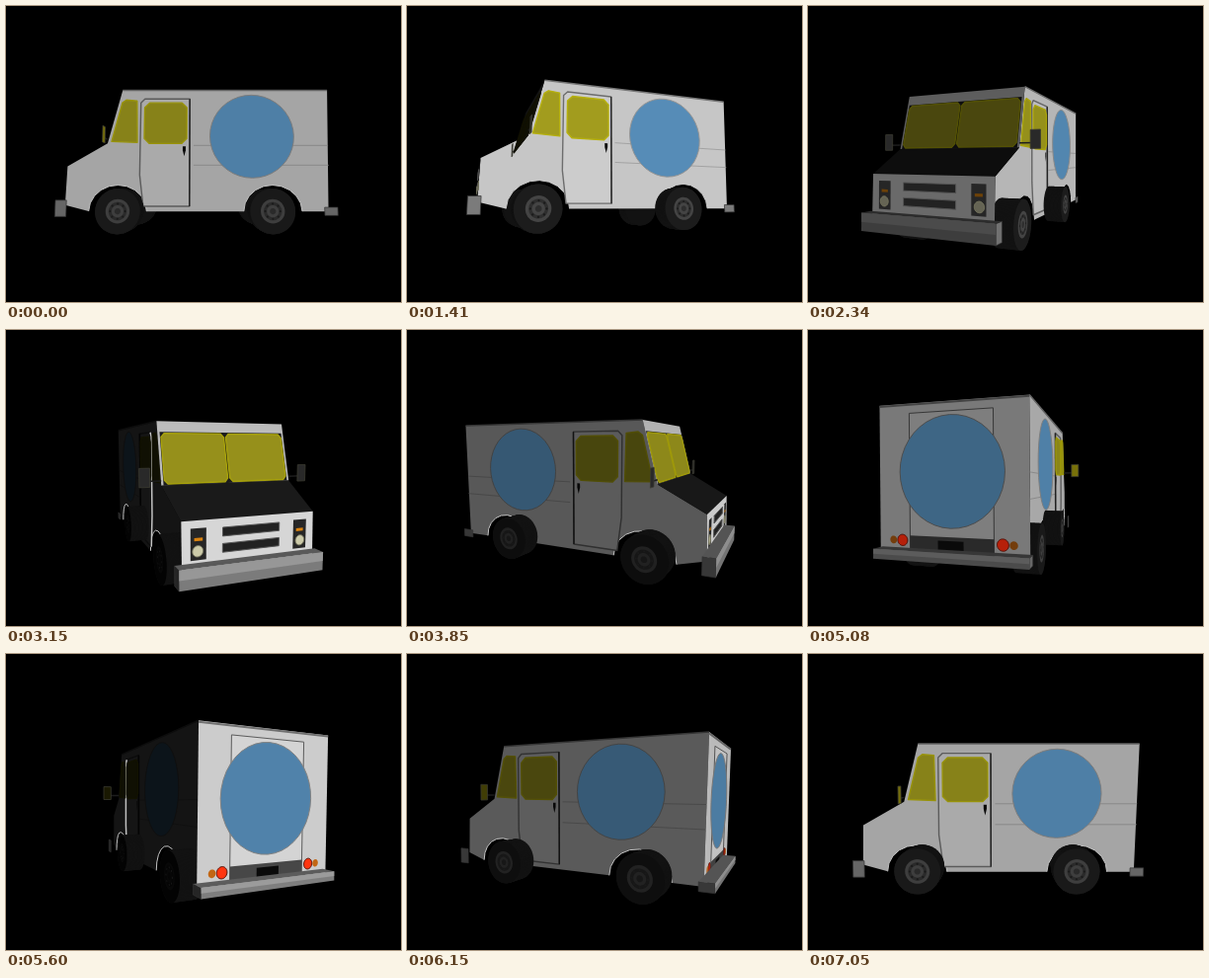
Recreate the animation shown at these times as an HTML page with a canvas. Size 400 by 300 pixels, loop 7.89 s.

```html
<!DOCTYPE html>
<html lang="en">
<head>
<meta charset="utf-8">
<title>Turning van</title>
<style>
  html, body { margin: 0; width: 100%; height: 100%; overflow: hidden; background: #000; }
  canvas { display: block; }
</style>
</head>
<body>
<canvas id="stage" width="400" height="300"></canvas>
<script>
const ctx = document.getElementById('stage').getContext('2d');
const LOOP = 7890, START = 700, STEP = 135, TURNS = 47;
const FOCAL = 362, HALF = 64;

// camera path: step, yaw, pitch, distance
const PATH = [
  [-1, 0, -6, 425], [5, 20, -8.5, 425], [18, 110.5, 5.3, 416], [28, 200, 3, 398],
  [32, 253, -1, 402], [40, 333, 2, 397], [47, 360, 3.3, 406]
];

// smooth curve through the path, at rest at both ends
function follow(k, col) {
  const last = PATH.length - 1;
  let i = 0;
  while (i < last - 1 && k >= PATH[i + 1][0]) i++;
  const a = PATH[i], b = PATH[i + 1], d = b[0] - a[0], u = (k - a[0]) / d, v = 1 - u;
  const slope = j => j < 1 || j >= last ? 0 :
    (PATH[j + 1][col] - PATH[j - 1][col]) / (PATH[j + 1][0] - PATH[j - 1][0]);
  return v * v * (1 + 2 * u) * a[col] + u * u * (3 - 2 * u) * b[col] +
    u * v * d * (v * slope(i) - u * slope(i + 1));
}

let cam;   // current view

function setCamera(k) {
  const [a, p] = [1, 2].map(c => follow(k, c) * Math.PI / 180);
  const dist = follow(k, 3);
  const pan = -13 * Math.sin(Math.PI * (k + 1) / (TURNS + 1)) ** 2;
  const ca = Math.cos(a), sa = Math.sin(a), cp = Math.cos(p), sp = Math.sin(p);
  // the lamp stands to the right of the viewer
  const lit = (across, toward) => Math.max(20, 165 * toward + 125 * across);
  cam = { ca, sa, cp, sp, dist, pan,
    x: dist * cp * sa, n: dist * cp * ca, h: dist * sp,
    left: lit(sa, ca), right: lit(-sa, -ca), front: lit(-ca, sa), back: lit(ca, -sa) };
}

// x runs to the nose, h up, n to the left-hand side
function project(x, h, n) {
  const q = -x * cam.sa - n * cam.ca;
  const k = FOCAL / (cam.dist + q * cam.cp - h * cam.sp);
  return [200 + cam.pan + k * (n * cam.sa - x * cam.ca), 150 - k * (h * cam.cp + q * cam.sp)];
}

const tint = (v, r = 1, g = r, b = r) =>
  `rgb(${[r, g, b].map(c => Math.round(Math.min(255, v * c))).join()})`;

function draw(pts, fill, stroke, width = 1, open) {
  ctx.beginPath();
  pts.forEach(p => ctx.lineTo(...p));
  if (!open) ctx.closePath();
  if (fill) { ctx.fillStyle = fill; ctx.fill(); }
  if (stroke) { ctx.strokeStyle = stroke; ctx.lineWidth = width; ctx.stroke(); }
}

const on = (place, pts) => pts.map(p => place(...p));
const rect = (a, b, c, d) => [[a, c], [b, c], [b, d], [a, d]];
const cut = (a, b, c, d, i, j = i) => [[a + i, c], [b - i, c], [b, c + j], [b, d - j],
  [b - i, d], [a + i, d], [a, d - j], [a, c + j]];
const arc = (x, y, rx, ry, turn, n) => Array.from({ length: n + 1 }, (_, i) =>
  [x + rx * Math.cos(i * turn / n), y + ry * Math.sin(i * turn / n)]);
const ring = (x, y, r) => arc(x, y, r, r, 2 * Math.PI, 40);

// does the strip between two profile points face the camera?
const faces = ([x0, h0], [x1, h1]) => (cam.x - x0) * (h0 - h1) + (cam.h - h0) * (x1 - x0) > 0;
const sideSeen = s => s * cam.n > HALF;
const sideLight = s => s > 0 ? cam.left : cam.right;

// the nose is a little narrower than the box
const wide = x => HALF - 0.09 * Math.max(0, x - 97);

const AXLES = [85.5, -69], HUB = -64;
const arch = x => arc(x, HUB, 29, 26, Math.PI, 10);
const ROOF = [83, 59], COWL = [97, 4], NOSE = [138, -19], CHIN = [139, -58];
const TAIL = [-127, 59], HEEL = [-124, -64];
const PROFILE = [TAIL, ROOF, COWL, NOSE, CHIN, ...AXLES.flatMap(arch), HEEL];

function badge(place, x, h, r, light) {
  const k = Math.min(0.4 + 0.6 * light / 222, light / 150);
  draw(on(place, ring(x, h, r)), tint(k, 92, 150, 196), tint(light, 0.75));
}

function glass(place, pts, light) {
  draw(on(place, pts), tint(light, 0.82, 0.79, 0.15), tint(light, 0.92, 0.89, 0.06), 1.4);
}

function side(s) {
  const light = sideLight(s), rim = tint(Math.max(195, light));
  const at = (x, h) => project(x, h, s * wide(x));
  draw(on(at, PROFILE), tint(light));
  draw(on(at, [TAIL, ROOF]), null, tint(light, 0.6), 1.5, true);
  for (const x of AXLES) draw(on(at, arch(x)), null, rim, 1, true);
  for (const h of [2, -18]) draw(on(at, [[10, h], [-126, h]]), null, tint(light, 0.78), 0.8, true);

  const edge = [[60, 50], [64, 46], [64, -28], [60, -59]];
  draw(on(at, [[14, 50], ...edge, [14, -59]]), tint(light, 1.03), tint(light, 0.55), 1.4);
  draw(on(at, [[14, 50], [14, -59]]), null, tint(light, 0.2), 1.4, true);
  if (light < 60) draw(on(at, edge), null, rim, 1.5, true);
  glass(at, cut(17, 60, 4, 46, 5), light);
  glass(at, [[68, 48], [79, 49], [83, 46], [93, 6], [67, 5]], light);
  draw(on(at, [[18, 1], [21, 1], [21, -3], [19.5, -9], [18, -3]]), '#080808');
  badge(at, -49, 11.6, 42.5, light);
}

function wheel(x, s) {
  const seen = sideSeen(s), outer = HALF - 1;
  const disc = (r, n, colour, dx = 0, dh = 0) =>
    draw(on((a, h) => project(a, h, s * n), ring(x + dx, HUB + dh, r)), colour);
  for (let i = 0; i <= 22; i++) disc(22.5, seen ? outer - 22 + i : outer - i, '#121212');
  if (!seen) return;
  const v = Math.min(1.1, sideLight(s) / 165);
  disc(22.5, outer, tint(v, 25));
  for (let r = 12; r > 0; r -= 3) disc(r, outer, tint(v, r % 2 ? 42 : 62));
  for (let a = 0; a < 6.2; a += Math.PI / 4) {
    disc(1, outer, '#1a1a1a', 7.5 * Math.cos(a), 7.5 * Math.sin(a));
  }
}

function strip(p, q, fill) {
  const span = (e, s) => project(...e, s * wide(e[0]));
  draw([span(p, -1), span(p, 1), span(q, 1), span(q, -1)], fill);
}

function front() {
  const light = cam.front;
  if (faces(ROOF, COWL)) {
    const pane = (n, t) => project(ROOF[0] + 14 * t, ROOF[1] - 55 * t, n);
    strip(ROOF, COWL, tint(light, 0.95));
    draw(on(pane, rect(-62, 62, 0.17, 1)), tint(light, 0.14));
    for (const n of [-61, 1]) glass(pane, cut(n, n + 60, 0.19, 0.98, 3, 0.06), light * 0.92);
  }
  if (faces(COWL, NOSE)) strip(COWL, NOSE, tint(light, 0.13));
  if (faces(NOSE, CHIN)) {
    const at = (n, h) => project(138.5, h, n);
    strip(NOSE, CHIN, tint(light, 1.08));
    for (const h of [-33, -46]) draw(on(at, rect(-26, 26, h, h + 7)), '#222', '#555');
    for (const s of [-1, 1]) {
      draw(on(at, rect(s * 40, s * 53, -50, -25)), '#262626');
      draw(on(at, rect(s * 43, s * 50, -35, -32.5)), tint(light, 1.1, 0.66, 0.08));
      draw(on(at, ring(s * 47, -43, 4.4)), tint(light, 1.03, 1.02, 0.85), '#77765f');
    }
  }
}

function back() {
  if (!faces(HEEL, TAIL)) return;
  const light = cam.back;
  const at = (n, h) => project(-127 + (59 - h) * 0.024, h, n);
  strip(HEEL, TAIL, tint(light));
  draw(on(at, [[-HALF, 58], [HALF, 58]]), null, tint(light, 0.55), 2, true);
  draw(on(at, rect(-36, 36, -62, 51)), tint(light, 1.04), tint(light, 0.45));
  badge(at, 0, 3, 45, light * 0.85);
  draw(on(at, rect(-36, 36, -62, -49)), tint(light, 0.35));
  draw(on(at, rect(-11, 11, -60, -52)), '#0a0a0a');
  for (const s of [-1, 1]) {
    draw(on(at, ring(s * 43, -53, 4.6)), tint(light, 1.5, 0.26, 0.08), '#501008');
    draw(on(at, ring(s * 51.5, -53, 3.2)), tint(light, 0.95, 0.5, 0.1));
  }
}

function bumper(inner, outer, low, high, light) {
  const w = HALF + 1, mid = (low + high) / 2;
  for (const s of [-1, 1]) {
    if (!sideSeen(s)) continue;
    const flank = (x, h) => project(x, h, s * w);
    draw(on(flank, rect(inner, outer, low, high)), tint(Math.max(sideLight(s), 60), 0.62), '#333', 0.7);
  }
  if (cam.x * Math.sign(outer) < Math.abs(outer)) return;
  const top = (x, n) => project(x, high, n), face = (n, h) => project(outer, h, n);
  if (cam.h > high) draw(on(top, rect(inner, outer, -w, w)), tint(light, 0.45));
  draw(on(face, rect(-w, w, low, high)), tint(light, 0.62));
  draw(on(face, rect(-w, w, mid, high)), tint(light, 0.76));
}

function mirror(s) {
  const at = (n, h) => project(97, h, n);
  const light = Math.max(cam.left, cam.right) * 0.75;
  draw(on(at, [[s * 64, 8], [s * 78, 8]]), null, '#1d1d1d', 1.5, true);
  draw(on(at, rect(s * 74, s * 83, 3, 19)),
    cam.x > 97 ? '#292929' : tint(light, 0.95, 0.9, 0.08), '#3a3a30', 0.8);
}

function render(t) {
  setCamera(Math.min(TURNS, Math.max(-1, Math.floor((t - START) / STEP))));
  ctx.fillStyle = '#000';
  ctx.fillRect(0, 0, 400, 300);
  const near = [-1, 1].filter(sideSeen), far = [-1, 1].filter(s => !sideSeen(s));
  const frontal = cam.x > 97;
  if (!frontal) far.forEach(mirror);
  far.forEach(s => AXLES.forEach(x => wheel(x, s)));
  near.forEach(s => {
    side(s);
    AXLES.forEach(x => wheel(x, s));
  });
  front();
  back();
  bumper(136, 147, -69, -53, cam.front);
  bumper(-120, -133, -68, -60, cam.back);
  if (frontal) far.forEach(mirror);
  near.forEach(mirror);
}

function tick(now) {
  render(now % LOOP);
  requestAnimationFrame(tick);
}

ctx.lineJoin = 'round';
render(0);
requestAnimationFrame(tick);
</script>
</body>
</html>
```
